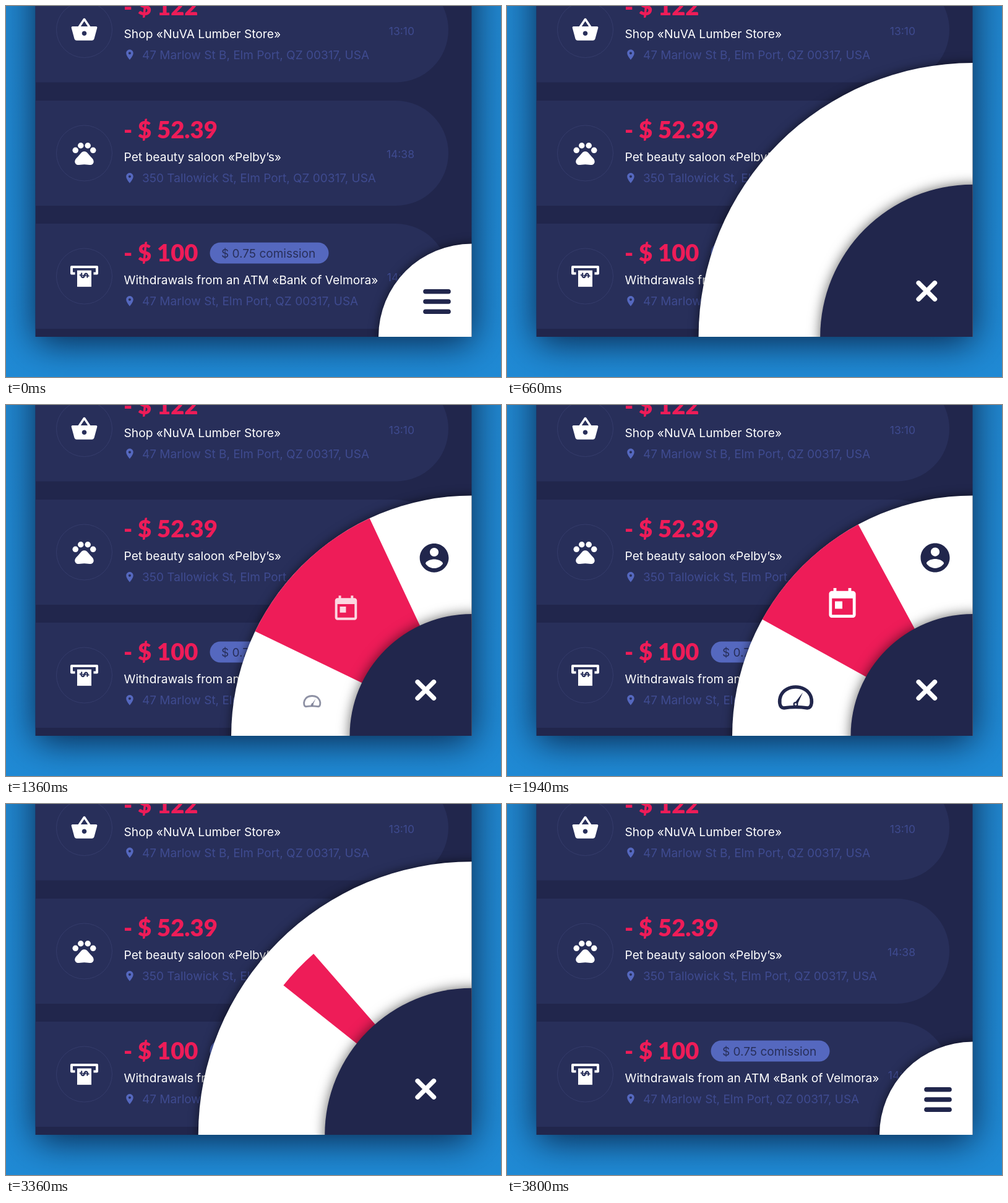
An HTML page with a canvas for the animation above (4.54 s loop, 800 px wide and 600 px high).

```html
<!DOCTYPE html>
<html lang="en">
<head>
<meta charset="utf-8">
<title>Radial menu</title>
<style>
  html, body { margin: 0; width: 100%; height: 100%; overflow: hidden; background: #1f87d1; }
  canvas { position: absolute; left: 0; top: 0; }
</style>
</head>
<body>
<canvas id="list" width="800" height="600"></canvas>
<canvas id="menu" width="800" height="600"></canvas>
<script>
const LOOP = 4540, TAU = Math.PI * 2;
const NAVY = [33, 38, 76], WHITE = [255, 255, 255];
const RED = '#ee1c58', CARD = '#282f5a', BLUE = '#5568bf', DIM = '#3f4b90', INK = '#21264c';
const PANEL = { x: 47.5, y: 0, w: 705, h: 535 };
const CX = 752.5, CY = 535;

// Icons on a 24 unit grid
const icons = {
  basket: 'M17.21 9l-4.38-6.56c-.19-.28-.51-.42-.83-.42-.32 0-.64.14-.83.43L6.79 9H2c-.55 0-1 .45-1 1 0 .09.01.18.04.27l2.54 9.27c.23.84 1 1.46 1.92 1.46h13c.92 0 1.69-.62 1.93-1.46l2.54-9.27L23 10c0-.55-.45-1-1-1h-4.79zM9 9l3-4.4L15 9H9zm3 8c-1.1 0-2-.9-2-2s.9-2 2-2 2 .9 2 2-.9 2-2 2z',
  pad: 'M17.34 14.86c-.87-1.02-1.6-1.89-2.48-2.91-.46-.54-1.05-1.08-1.75-1.32-.35-.1-.75-.13-1.11-.13s-.8.03-1.12.14c-.7.24-1.28.78-1.75 1.32-.87 1.02-1.6 1.89-2.48 2.91-1.31 1.31-2.92 2.76-2.62 4.79.29 1.02 1.02 2.03 2.33 2.32.73.15 3.06-.44 5.54-.44h.18c2.48 0 4.81.58 5.54.44 1.31-.29 2.04-1.31 2.33-2.32.31-2.04-1.3-3.49-2.61-4.8z',
  pin: 'M12 2C8.13 2 5 5.13 5 9c0 5.25 7 13 7 13s7-7.75 7-13c0-3.87-3.13-7-7-7zm0 9.5c-1.38 0-2.5-1.12-2.5-2.5s1.12-2.5 2.5-2.5 2.5 1.12 2.5 2.5-1.12 2.5-2.5 2.5z',
  person: 'M12 2C6.48 2 2 6.48 2 12s4.48 10 10 10 10-4.48 10-10S17.52 2 12 2zm0 3c1.66 0 3 1.34 3 3s-1.34 3-3 3-3-1.34-3-3 1.34-3 3-3zm0 14.2c-2.5 0-4.71-1.28-6-3.22.03-1.99 4-3.08 6-3.08 1.99 0 5.97 1.09 6 3.08-1.29 1.94-3.5 3.22-6 3.22z',
  calendar: 'M19 3h-1V1h-2v2H8V1H6v2H5c-1.11 0-1.99.9-1.99 2L3 19c0 1.1.89 2 2 2h14c1.1 0 2-.9 2-2V5c0-1.1-.9-2-2-2zm0 16H5V8h14v11zM7 10h5v5H7z'
};
for (const name in icons) icons[name] = new Path2D(icons[name]);
const dome = new Path2D('M-19 17C-27 17-27 4-24-3C-20-12-10-17 0-17S20-12 24-3C27 4 27 17 19 17Q0 14-19 17z');
const needle = new Path2D('M-2 9.5L11.5-8L2.5 12z');

const clamp = u => Math.min(1, Math.max(0, u));
const span = (t, start, length) => clamp((t - start) / length);
const smooth = u => u * u * (3 - 2 * u);
const outBack = (u, s) => 1 + (s + 1) * (u - 1) ** 3 + s * (u - 1) ** 2;
const mix = (a, b, k) => `rgb(${a.map((v, i) => Math.round(v + (b[i] - v) * k))})`;

function disc(c, x, y, r, fill) {
  c.beginPath();
  c.arc(x, y, r, 0, TAU);
  c.fillStyle = fill;
  c.fill();
}

function shadow(c, blur, color, dy = 0) {
  c.shadowBlur = blur;
  c.shadowColor = color;
  c.shadowOffsetY = dy;
}

function at(c, x, y, scale, draw) {
  c.save();
  c.translate(x, y);
  c.scale(scale, scale);
  draw();
  c.restore();
}

function clipToPanel(c) {
  c.beginPath();
  c.rect(PANEL.x, PANEL.y, PANEL.w, PANEL.h);
  c.clip();
}

// ---- transaction list, drawn once ----
const list = document.getElementById('list').getContext('2d');

function label(str, x, y, font, color, align = 'left') {
  list.font = font + ', sans-serif';
  list.fillStyle = color;
  list.textAlign = align;
  list.fillText(str, x, y);
}

function drawBasket() {
  list.fill(icons.basket);
}

function drawPaw() {
  for (const [x, y] of [[4.5, 9.5], [9, 5.5], [15, 5.5], [19.5, 9.5]]) disc(list, x, y, 2.5, '#fff');
  list.fill(icons.pad);
}

function drawCash() {
  list.translate(12, 12);
  list.scale(1 / 1.9, 1 / 1.9);
  list.strokeStyle = '#fff';
  list.lineWidth = 4;
  list.lineJoin = 'round';
  list.stroke(new Path2D('M-15-4.5h-5.5v-10.5h41v10.5h-5.5'));
  list.fillRect(-11.5, -9.5, 23, 26.5);
  list.rotate(Math.PI / 2);
  label('$', -1.5, 5.5, '900 17px Lato', CARD, 'center');
}

function drawCard({ y, amount, title, address, time, icon, fee }) {
  list.beginPath();
  list.roundRect(PANEL.x, y - 85, 667.5, 170, [0, 85, 85, 0]);
  list.fillStyle = CARD;
  list.fill();

  list.beginPath();
  list.arc(126.5, y, 45, 0, TAU);
  list.strokeStyle = '#353c6b';
  list.lineWidth = 1;
  list.stroke();
  list.fillStyle = '#fff';
  at(list, 103.7, y - 22.7, 1.9, icon);

  label(amount, 190, y - 24, '900 38.2px Lato', RED);
  label(title, 190.5, y + 13, '400 19.2px Inter', '#fff');
  label(address, 220, y + 47, '400 19px Inter', DIM);
  label(time, 660, y + 8, '400 17.5px Inter', DIM, 'right');
  list.fillStyle = BLUE;
  at(list, 190.1, y + 30.4, .82, () => list.fill(icons.pin));

  if (fee) {
    list.beginPath();
    list.roundRect(329.5, y - 54.5, 192, 34, 17);
    list.fill();
    label(fee, 348, y - 30, '400 19px Inter', CARD);
  }
}

function drawList() {
  const sky = list.createLinearGradient(0, 0, 0, 600);
  sky.addColorStop(0, '#2086ce');
  sky.addColorStop(1, '#1e89d4');
  list.fillStyle = sky;
  list.fillRect(0, 0, 800, 600);

  // The panel continues above the stage, so its side shadows do not fade at the top
  list.save();
  shadow(list, 56, 'rgba(5,20,50,.85)', 10);
  list.fillStyle = INK;
  list.fillRect(PANEL.x, -100, PANEL.w, PANEL.h + 100);
  list.restore();

  clipToPanel(list);
  [
    { y: 38.5, amount: '- $ 122', title: 'Shop «NuVA Lumber Store»', icon: drawBasket,
      address: '47 Marlow St B, Elm Port, QZ 00317, USA', time: '13:10' },
    { y: 238, amount: '- $ 52.39', title: 'Pet beauty saloon «Pelby’s»', icon: drawPaw,
      address: '350 Tallowick St, Elm Port, QZ 00317, USA', time: '14:38' },
    { y: 437, amount: '- $ 100', title: 'Withdrawals from an ATM «Bank of Velmora»', icon: drawCash,
      address: '47 Marlow St, Elm Port, QZ 00317, USA', time: '14:55', fee: '$ 0.75 comission' }
  ].forEach(drawCard);
}

// ---- radial menu ----
const menu = document.getElementById('menu').getContext('2d');
const closing = t => t > 2900;

// Springy opening and its mirrored closing
const swell = (t, open, close) => closing(t)
  ? outBack(1 - span(t, close, 508), 2.8)
  : outBack(span(t, open, 520), 3.55);

const fan = (t, open, close) => closing(t)
  ? 1 - span(t, close, 400) ** 2
  : outBack(span(t, open, 520), 3.55);

const fade = (t, open, openTime, close, closeTime) =>
  span(t, open, openTime) - span(t, close, closeTime);

function drawWedge(t, radius) {
  const low = 45.3 - 16.3 * fan(t, 997, 3056);
  const high = 45.3 + 16.3 * fan(t, 1000, 3008);
  if (high - low < .01) return;
  const angle = degrees => Math.PI + degrees * Math.PI / 180;
  menu.beginPath();
  menu.moveTo(CX, CY);
  menu.arc(CX, CY, Math.min(radius, 388.5), angle(low), angle(high));
  menu.fillStyle = RED;
  menu.fill();
}

function drawGauge() {
  menu.strokeStyle = INK;
  menu.lineWidth = 5.5;
  menu.stroke(dome);
  menu.fill(needle);
  disc(menu, 0, 11, 4, INK);
  disc(menu, 0, 11, 1.7, '#fff');
}

const gridIcon = (path, scale) => () => {
  menu.scale(scale, scale);
  menu.translate(-12, -12);
  menu.fill(path);
};

const items = [
  { x: 692, y: 247, color: INK, open: 1150, close: 2980, draw: gridIcon(icons.person, 2.35) },
  { x: 542, y: 322.4, color: '#fff', open: 1200, close: 3030, draw: gridIcon(icons.calendar, 2.4) },
  { x: 466.5, y: 473, color: INK, open: 1250, close: 3080, draw: drawGauge }
];

function drawItem(t, { x, y, color, open, close, draw }) {
  const k = smooth(fade(t, open, 220, close, 200));
  if (!k) return;
  const reach = .8 + .2 * k;
  menu.globalAlpha = k;
  menu.fillStyle = color;
  at(menu, CX + (x - CX) * reach, CY + (y - CY) * reach, k, draw);
  menu.globalAlpha = 1;
}

function drawButton(t) {
  const k = smooth(fade(t, 380, 260, 3420, 220));
  menu.strokeStyle = mix(NAVY, WHITE, k);
  menu.lineWidth = 7.6;
  menu.lineCap = 'round';
  for (const side of [-1, 0, 1]) {
    const half = side ? 18.5 : 18.5 * (1 - k);
    if (half < .1) continue;
    menu.save();
    menu.translate(696.5 - 18.2 * k, 478 - 17 * k + side * 16.3 * (1 - k));
    menu.rotate(side * k * Math.PI / 4);
    menu.beginPath();
    menu.moveTo(-half, 0);
    menu.lineTo(half, 0);
    menu.stroke();
    menu.restore();
  }
}

function drawMenu(t) {
  const dip = 3 * Math.sin(Math.PI * span(t, 836, 420));
  const outer = 150.5 + 238 * swell(t, 316, 3100) - dip;
  const inner = 197 * Math.max(0, swell(t, 330, 3070));
  const shade = fade(t, 330, 145, 3480, 110);

  menu.clearRect(0, 0, 800, 600);
  menu.save();
  clipToPanel(menu);

  shadow(menu, 16, 'rgba(0,0,0,.6)');
  disc(menu, CX, CY, outer, '#fff');
  shadow(menu, 0, 'transparent');

  drawWedge(t, outer);
  items.forEach(item => drawItem(t, item));

  if (shade > 0) {
    shadow(menu, 20, `rgba(0,0,0,${.6 * shade})`);
    disc(menu, CX, CY, Math.min(inner, outer), mix(WHITE, NAVY, shade));
    shadow(menu, 0, 'transparent');
  }
  drawButton(t);
  menu.restore();
}

function tick() {
  drawMenu(performance.now() % LOOP);
  requestAnimationFrame(tick);
}

drawList();
tick();
</script>
</body>
</html>
```
